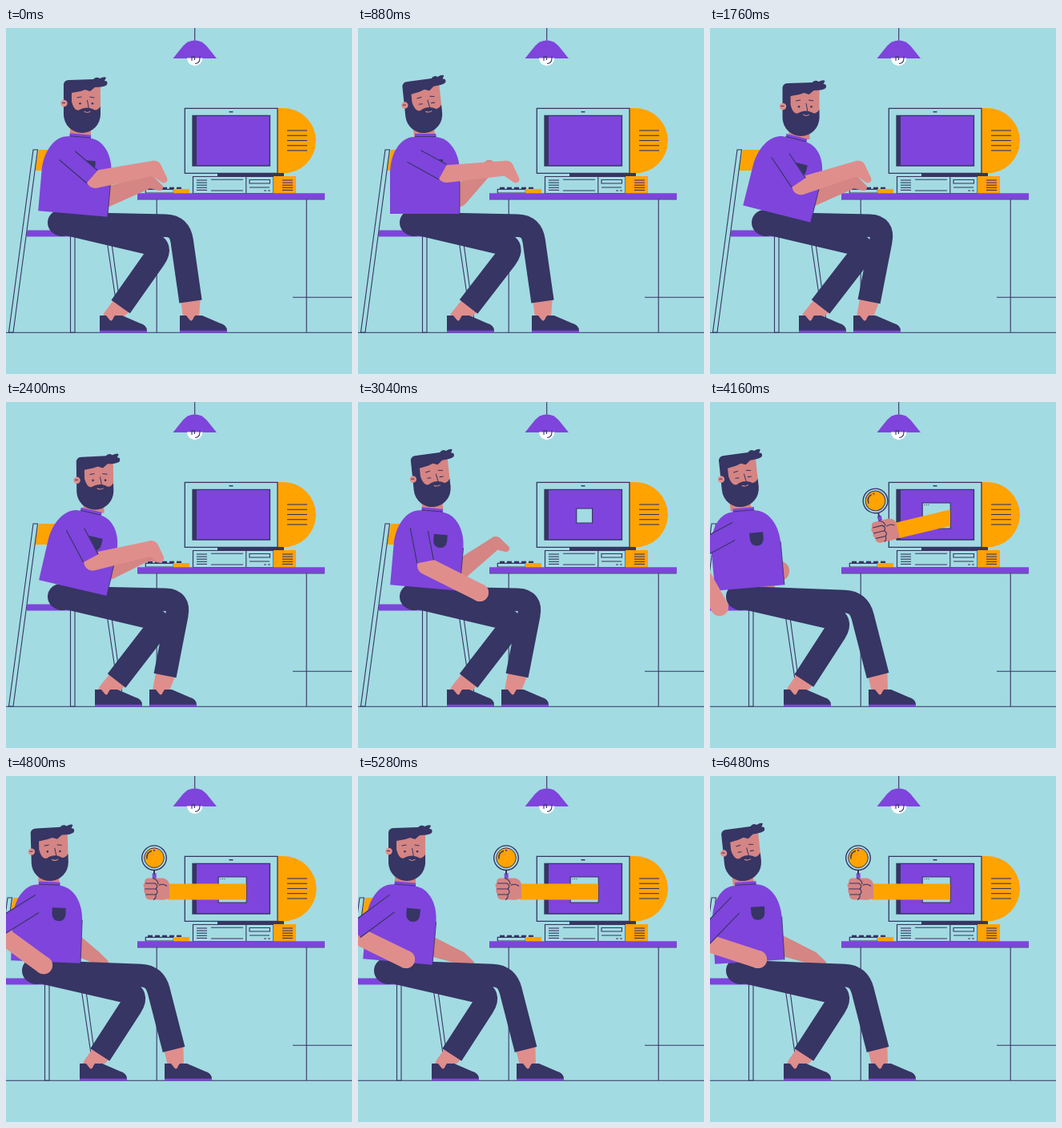
An HTML page with a canvas for the animation above (6.56 s loop, 432 px wide and 432 px high).

```html
<!DOCTYPE html>
<html lang="en">
<head>
<meta charset="utf-8">
<title>Desk helper</title>
<style>
html, body { margin: 0; width: 100%; height: 100%; overflow: hidden; background: #a3dbe2; }
canvas { display: block; width: 100vw; height: 100vh; }
</style>
</head>
<body>
<canvas id="stage" width="432" height="432"></canvas>
<script>
const c = document.getElementById('stage').getContext('2d');
const BG = '#a3dbe2', PURPLE = '#7e44dc', DARK = '#363563', ORANGE = '#ffa300',
  SKIN = '#e08e8c', SHADE = '#d58583';
const LOOP = 6560, STEP = 80, RAD = Math.PI / 180;

const mix = (a, b, p) => [a[0] + (b[0] - a[0]) * p, a[1] + (b[1] - a[1]) * p];

// Everything that moves, as sums of eased steps
function poseAt(t) {
  const s = (from, to) => {
    const p = Math.max(0, Math.min(1, (t - from) / (to - from)));
    return (1 - Math.cos(Math.PI * p)) / 2;
  };
  const sitBack = s(0, 560), lean = s(960, 1440), rest = s(2300, 2760),
    push = s(3600, 4080), look = s(4500, 4960), sigh = s(5360, 5760);
  const recline = sitBack - lean, away = push - look + .85 * sigh;
  const travel = (first, ...stops) => stops.reduce((at, [to, p]) => mix(at, to, p), first);
  const reach = s(3440, 3960), settle = s(4240, 4640);
  return {
    tilt: 5 - 5 * recline + 9 * (lean - rest) - 10 * away,
    headTilt: -6 * (recline + rest - look + sigh),
    slide: -32 * push,
    near: 117 - 6 * sitBack - 19 * push,
    far: 217 - 38 * lean + 19 * push,
    grip: 1 - rest,
    tap: 2.5 * (1 - rest) * Math.sin(2 * Math.PI * t / 440),
    hand: travel([185, 175], [[152, 238], rest], [[12, 256], push], [[60, 229], look]),
    farHand: travel([179, 192], [[164, 173], recline], [[172, 176], rest],
      [[64, 222], push], [[128, 227], look]),
    popup: s(2780, 3260),
    reach,
    armHidden: 135 - 106 * reach - 29 * settle,
    armAngle: -4 - 9.5 * reach + 13.5 * settle,
    bulge: t > 3040 && t < 5280 ? 1.5 * Math.abs(Math.sin(Math.PI * (t - 3040) / 560)) : 0
  };
}

function fill(d, color) { c.fillStyle = color; c.fill(new Path2D(d)); }
function line(d, width = 1.1, color = DARK) {
  c.strokeStyle = color; c.lineWidth = width; c.stroke(new Path2D(d));
}
function box(x, y, w, h, color, outline) {
  const d = `M${x} ${y}h${w}v${h}h${-w}z`;
  if (color) fill(d, color);
  if (outline) line(d, outline);
}
function disc(x, y, r, color, outline) {
  c.beginPath(); c.arc(x, y, r, 0, 7);
  c.fillStyle = color; c.fill();
  if (outline) { c.strokeStyle = DARK; c.lineWidth = outline; c.stroke(); }
}
function rows(x, w, y, gap) {
  for (let i = 0; i < 5; i++) line(`M${x} ${y + i * gap}h${w}`);
}
// Tapered limb with round ends
function limb([x1, y1], r1, [x2, y2], r2, color) {
  const a = Math.atan2(y2 - y1, x2 - x1), dist = Math.hypot(x2 - x1, y2 - y1) || .01;
  const d = Math.acos(Math.max(-1, Math.min(1, (r1 - r2) / dist)));
  c.beginPath();
  c.arc(x1, y1, r1, a + d, a - d + 2 * Math.PI);
  c.arc(x2, y2, r2, a - d, a + d);
  c.fillStyle = color; c.fill();
}
function pivoted(x, y, toX, toY, angle, draw) {
  c.save();
  c.translate(toX, toY); c.rotate(angle * RAD); c.translate(-x, -y);
  draw();
  c.restore();
}

function room() {
  c.fillStyle = BG; c.fillRect(0, 0, 432, 432);
  line('M0 380.3H432M358 336.2H432M188.200 214V380M375.200 214V380M235.700 0V17');
  fill('M208.500 38L221 22.500Q227 15.500 235.700 15.500T250.500 22.500L263 38z', PURPLE);
  fill('M226 37.500A9.700 9.700 0 0 0 245.400 37.500z', '#fff');
  line('M232 41V36h3.500v4M236 44.500q6 0 6-7V35.500');
}

function chair(x) {
  c.save(); c.translate(x, 0);
  fill('M41 152H64V178H36z', ORANGE);
  line('M34 152h5.500L9 380H3.500zM121 232L143 380M127 232L147 380');
  box(80.5, 258, 5.5, 122, BG, 1.1);
  box(26, 252.5, 62, 8, PURPLE);
  c.restore();
}

function computer(bulge) {
  fill(`M339 100H346A${41 + bulge} 40.700 0 0 1 346 181.400H339z`, ORANGE);
  rows(351, 25, 128, 6.25);
  box(223.3, 100.3, 115.7, 81, BG, 1.3);
  line('M278.500 104.700h5', 1.5);
  box(233, 109.3, 96.5, 62.7, PURPLE, 1.3);
  box(233, 109.3, 5, 62.7, DARK);
  box(264, 181, 83, 4.5, DARK);
  box(233.5, 185.5, 100.5, 21, BG, 1.2);
  box(334, 185, 28, 22, ORANGE);
  line('M299.800 185.500v21M256 189.200h40M256 203h40M304 199h25M322 203h3M327 203h3');
  box(304, 189.5, 25.5, 4.5, null, 1.1);
  rows(238, 13, 190, 3.1);
  rows(345, 13, 190, 3.1);
  box(174.3, 201.3, 35, 4.7, BG, 1.2);
  for (let i = 0; i < 5; i++) box(177 + i * 9, 198.7, 6, 2.3, DARK);
  box(209, 201, 20, 5.5, ORANGE);
  box(164, 206.3, 234, 7.5, PURPLE);
  line('M164 214H398', .9);
}

function popup(size) {
  if (!size) return;
  box(282.7 - 17.5 * size, 142 - 16 * size, 35 * size, 32 * size, BG, 1.1);
  if (size > .8) line('M267.500 128.500h1M270 128.500h1M272.500 128.500h1');
}

function robotArm({ reach, armHidden, armAngle }) {
  if (!reach) return;
  const size = .4 + .6 * reach;
  c.save();
  c.beginPath(); c.rect(0, 0, 300, 432); c.clip();
  c.translate(300, 144.5); c.rotate(armAngle * RAD); c.scale(size, size);
  c.translate(armHidden - 300, -145);
  box(202, 135, 240, 20, ORANGE);
  disc(185, 102.7, 15.3, BG, 1.4);
  disc(185, 102.7, 12.3, ORANGE, 1);
  line('M176 104Q175 96 182 94M184 93.500h2', 1.4);
  box(182.7, 122, 5, 8, PURPLE);
  line('M185 118V123', 2);
  fill('M178 128H196Q204 130 204 137V153Q199 156 190 155H179Q173 154 174 148Q171 145 173 141Q170 137 173 134Q173 128 178 128z', SHADE);
  line('M174 134.500H186M173 141.500H187M174 148.500H187M183 128Q190 130 190 136M186 134.500Q191 138 187 141.500Q191 145 187 148.500Q188 153 184 155M191 137Q196 134 201 138');
  c.restore();
}

function leg(hip, knee, ankleY, foot) {
  const ankle = [foot + 13.5 + .16 * (knee[0] - foot), ankleY];
  limb(ankle, 12, [foot + 14, 361], 10, SKIN);
  disc(...hip, 16, DARK);
  const a = mix(knee, hip, .12), b = mix(knee, ankle, .2);
  line(`M${hip}L${a}Q${knee} ${b}L${ankle}`, 28.5);
  c.save(); c.translate(foot, 359);
  fill('M0 0H8L12 5Q15 9 17 3L19 0H28L50 9.500Q59 12 59 19H0z', DARK);
  box(0, 18.7, 59, 2.8, PURPLE);
  c.restore();
}

function head(shut) {
  box(79, 73, 38, 37, SHADE);
  fill('M71 94V108A23 23 0 0 0 117 108V98Q112 105 107 101Q100 98 93 101Q85 107 81 92z', DARK);
  fill('M71 98V70Q72 65 78 65L108 64Q112 60 116 63Q122 60 124 62L122 66Q127 66 125 71Q122 74 110 74L104 79 98 77 92 79 81 81V98z', DARK);
  disc(71.5, 94, 4.2, SKIN);
  line('M69 93.500h4', 1);
  line('M100.500 90L102.500 101H99M87.500 87l6-1M103.500 86l6 1', 1);
  line('M96.500 104.300q4 2.500 8 0', 1, SKIN);
  for (const x of [91.5, 107]) {
    if (shut) line(`M${x - 2.5} 94.500h5`);
    else disc(x, 94.3, 1.3, DARK);
  }
}

function torso() {
  box(71, 132, 26.5, 7, PURPLE);
  fill('M40 232V182C40 155 54 136 70 136H97C114 137 127 155 127 180V232z', PURPLE);
  line('M71 135.500H97.500', .9);
  line('M127 178V232', .8);
  fill('M89 164h17v8q-1 8.500-8.500 8.500T89 172z', DARK);
}

// Two-bone reach: elbow on the lower side of the line to the hand
function elbowFor([sx, sy], [hx, hy], upper, fore) {
  const dx = hx - sx, dy = hy - sy, d = Math.hypot(dx, dy);
  const along = (upper ** 2 - fore ** 2 + d * d) / (2 * d);
  const out = Math.sqrt(Math.max(0, upper ** 2 - along ** 2));
  return [sx + (dx * along - dy * out) / d, sy + (dy * along + dx * out) / d];
}

function sleeve([sx, sy], [ex, ey]) {
  const length = Math.hypot(ex - sx, ey - sy);
  c.save();
  c.translate(sx, sy); c.rotate(Math.atan2(ey - sy, ex - sx));
  disc(0, 0, 10.5, PURPLE);
  box(0, -11, length - 5, 22, PURPLE);
  line(`M4 -10.500H${length - 5}M-4 10.500H${length - 5}`);
  c.restore();
}

function man({ tilt, headTilt, slide, near, far, grip, tap, hand, farHand }) {
  const a = tilt * RAD, sin = Math.sin(a), cos = Math.cos(a);
  const bodyX = 83 + slide * 1.06;

  const [fx, fy] = [farHand[0], farHand[1] - tap];
  limb([125 + slide * 1.2, 211], 12.5, [fx, fy], 8, SHADE);
  limb([fx, fy], 8, [fx + 13, fy + 7], 4, SHADE);
  leg([70 + slide, 244], [217 + slide * .97, 247 - slide * .08], 341.5, far);
  leg([68 + slide, 243], [196 + slide * .94, 273], 348, near);

  const neck = [bodyX + 1.5 + 120 * sin, 130 + Math.max(0, tilt - 5) * .44];
  pivoted(94, 130, ...neck, headTilt, () => box(79, 120, 26, 15, SHADE));
  pivoted(83, 232, bodyX, 232, tilt, torso);
  pivoted(94, 130, ...neck, headTilt, () => head(headTilt < -3));

  const shoulder = [bodyX - 13 * cos + 72 * sin, 232 - 72 * cos - 13 * sin];
  const [hx, hy] = [hand[0], hand[1] + tap];
  const elbow = elbowFor(shoulder, [hx, hy], 46 - slide * .5, 75);
  const wrist = 11 - 1.7 * grip;
  limb(elbow, 11, [hx, hy], wrist, SKIN);
  limb([hx, hy], wrist, [hx + 12 * grip, hy + 14 * grip], 11 - 6.5 * grip, SKIN);
  sleeve(shoulder, elbow);
}

const start = performance.now();
function frame() {
  const t = Math.floor((performance.now() - start) % LOOP / STEP) * STEP;
  const pose = poseAt(t);
  room();
  chair(pose.slide);
  computer(pose.bulge);
  popup(pose.popup);
  robotArm(pose);
  man(pose);
  requestAnimationFrame(frame);
}
frame();
</script>
</body>
</html>
```
